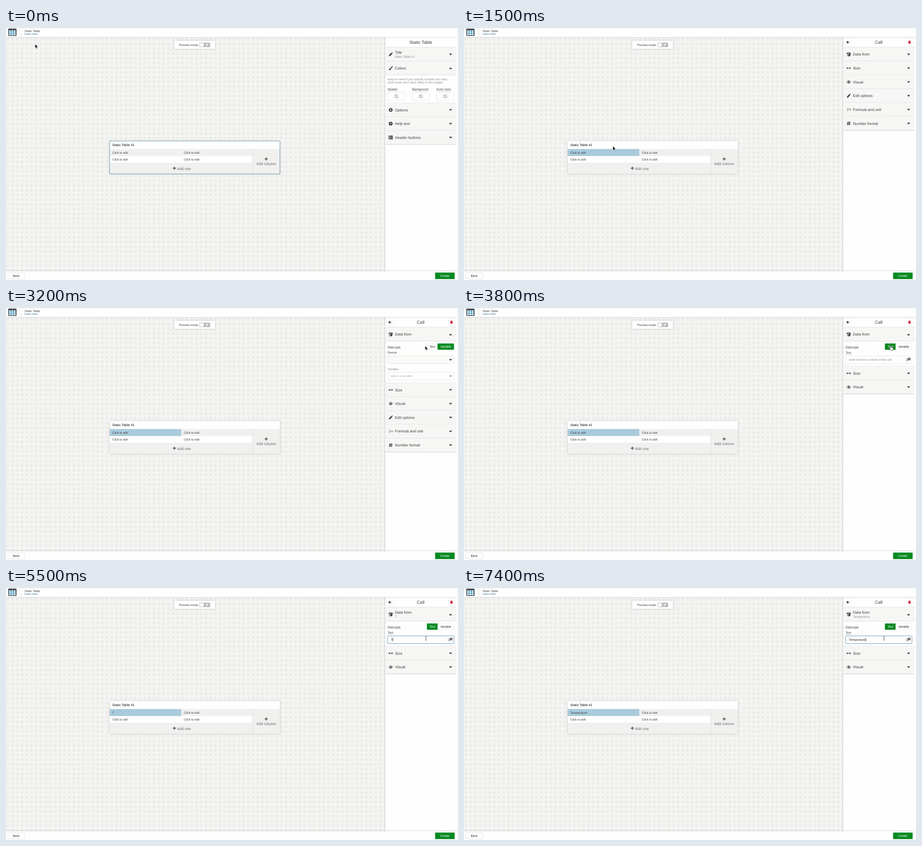
An HTML page that plays this animation: 1002 by 559 pixels, repeating every 8000 ms.

```html
<!DOCTYPE html>
<html lang="en">
<head>
<meta charset="utf-8">
<title>Static table editor</title>
<style>
html, body { margin: 0; width: 100%; height: 100%; overflow: hidden; background: #fefefe; }
svg { display: block; width: 100%; height: 100%; }
text { font-family: "Liberation Sans", Arial, sans-serif; text-rendering: geometricPrecision; white-space: pre; }
.shade { filter: drop-shadow(0 .7px 1.6px rgba(0, 0, 0, .28)); }
</style>
</head>
<body>
<svg viewBox="0 0 1002 559">
  <defs>
    <pattern id="dots" x="-1" y="20" width="10.45" height="10.45" patternUnits="userSpaceOnUse">
      <rect x="2.4" y="2.4" width="5.8" height="5.8" rx="1.4" fill="#ebebe9"/>
    </pattern>
  </defs>
  <g id="base"></g>
  <g id="live"></g>
</svg>
<script>
const LOOP = 8000, INK = '#3c3c3c', GREEN = '#0a8a23', BLUE = '#1b7095', ROW = 30.65;
const $ = id => document.getElementById(id);

const rect = (x, y, w, h, fill, extra = '') =>
  `<rect x="${x}" y="${y}" width="${w}" height="${h}" fill="${fill}" ${extra}/>`;
const box = (x, y, w, h, fill = '#fefefe', stroke = '#dcdcdc', rx = 1) =>
  rect(x, y, w, h, fill, `stroke="${stroke}" stroke-width=".7" rx="${rx}"`);
const path = (d, fill = INK, extra = '') => `<path d="${d}" fill="${fill}" ${extra}/>`;
const line = (d, stroke = INK, w = 1, extra = '') =>
  `<path d="${d}" fill="none" stroke="${stroke}" stroke-width="${w}" ${extra}/>`;
const circle = (x, y, r, fill, extra = '') =>
  `<circle cx="${x}" cy="${y}" r="${r}" fill="${fill}" ${extra}/>`;
const text = (x, y, s, size = 6.69, fill = INK, extra = '') =>
  `<text x="${x}" y="${y}" font-size="${size}" fill="${fill}" ${extra}>${s}</text>`;
const mid = (x, y, s, size, fill) => text(x, y, s, size, fill, 'text-anchor="middle"');
const at = (x, y, s, k = 1) => `<g transform="translate(${x} ${y}) scale(${k})">${s}</g>`;
const hint = (x, y, s, w) =>
  text(x, y, s) + line(`M${x} ${y + 1.5}h${w}`, '#555', .6, 'stroke-dasharray="1 .6"');
const plus = (x, y) => line(`M${x - 3.4} ${y}h6.8M${x} ${y - 3.4}v6.8`, '#5a5a5a', 1.9);
const caret = (y, up, fill = INK) => at(985.6, y, path('M-3.4 -1.8H3.4L0 2Z', fill), up ? '1 -1' : 1);

const PENCIL = c => path('M-4.2 4.2L-3.5 1.3L1.3 -3.5L3.5 -1.3L-1.3 3.5ZM2 -4.1L2.6 -4.6Q3.1 -4.9 3.6 -4.4L4.4 -3.6Q4.9 -3.1 4.5 -2.6L4 -2.1Z', c);
const ICONS = {
  pencil: PENCIL(INK),
  brush: path('M4.4 -4.5Q5 -4 4.4 -3.1L1.2 1.2L-.7 -.5L3.3 -4.2Q4 -4.8 4.4 -4.5ZM-1.2 .1L.6 1.8Q.6 4.2 -2 4.3Q-4 4.4 -4.6 2.3Q-3.5 2.8 -3.1 1.6Q-2.5 0 -1.2 .1Z'),
  cog: circle(0, 0, 2.5, 'none', `stroke="${INK}" stroke-width="2"`) +
    circle(0, 0, 3.9, 'none', `stroke="${INK}" stroke-width="1.3" stroke-dasharray="1.6 1.463"`),
  help: circle(0, 0, 4.3, INK) + mid(0, 2.5, '<tspan font-weight="bold">?</tspan>', 7, '#fff'),
  list: [-3, 0, 3].map(y => rect(-4.7, y - 1.2, 2.3, 2.3, INK) + rect(-1.7, y - 1.2, 6.5, 2.3, INK)).join(''),
  data: path('M-4.3 -2.4Q-4 -4.4 0 -4.4Q4.6 -4.4 4.4 -2.4L3.5 3Q2.9 4.4 -.2 4.4Q-2.9 4.4 -3.3 3Z') +
    path('M-3 -2.6Q0 -4.2 3 -2.7Q0 -1.3 -3 -2.6ZM-3.3 -.6L-.3 -.1L-.8 3L-2.7 2.3Z', '#f6f6f5'),
  size: line('M-3.5 0H3.5', INK, 1.1) + path('M-5 0L-2.4 -2.4V2.4ZM5 0L2.4 -2.4V2.4Z'),
  eye: line('M-4.6 0Q0 -6 4.6 0Q0 6 -4.6 0Z', INK, 1) + circle(0, 0, 2, INK) + circle(-.6, -.7, .7, '#f6f6f5'),
  formula: text(-4.8, 2.1, 'ƒ<tspan dy="-1" font-size="5.4">(x)</tspan>', 7, INK, 'font-style="italic"'),
  hash: line('M-1 -4.2L-2.3 4.2M2.3 -4.2L1 4.2M-3.8 -1.6H4.3M-4.3 1.6H3.8', INK, 1.3)
};

const CURSORS = {
  arrow: path('M0 0V9.2L2.1 7.3L3.7 10.6L5.2 9.9L3.7 6.8H6.6Z', '#111', 'stroke="#fff" stroke-width=".6"'),
  hand: path('M-1 .8Q-.9 -.1 0 0Q.8 0 .9 .9V3.7Q1.9 3.1 2.5 4Q3.4 3.5 4 4.4Q5.4 4.2 5.4 5.5V7.4Q5.3 9 4.5 10.8H-.1Q-.9 9.3 -3 7Q-3.7 5.9 -2.7 5.7Q-1.9 5.7 -1 6.8Z', '#fff', 'stroke="#222" stroke-width=".8"') +
    line('M.9 3.7V5.6M2.5 4V5.8M4 4.4V6', '#222', .5),
  beam: line('M-1.5 -3.9Q0 -3.9 0 -3V3Q0 3.9 -1.5 3.9M1.5 -3.9Q0 -3.9 0 -3M0 3Q0 3.9 1.5 3.9', '#222', .8)
};

// Pointer track: time, x, y; positions advance in 100 ms ticks
const TRACK = [
  [0, 64.5, 35.5], [200, 180, 74], [400, 440, 165], [500, 488, 212], [600, 420, 246], [700, 335, 269],
  [800, 305.5, 271.5], [1400, 305.5, 271.5], [1500, 330, 262], [1700, 540, 178], [2000, 787, 57],
  [2100, 787, 57], [2200, 868, 45.5], [2300, 873, 55], [2400, 876.5, 52], [2700, 876.5, 52],
  [2800, 878.5, 51.5], [2900, 878.5, 51.5], [3000, 856, 66], [3200, 929, 84], [3300, 976, 82],
  [3600, 946, 83], [3900, 946, 83], [4000, 945, 88], [4300, 932, 111], [4600, 931, 112]
];
const SHAPES = [[0, 'arrow'], [700, 'hand'], [1500, 'arrow'], [2200, 'hand'], [3000, 'arrow'],
  [3300, 'hand'], [4100, 'arrow'], [4200, 'beam']];
const KEYS = [5500, 5700, 5800, 6000, 6400, 6800, 6900, 7000, 7200, 7300, 7400];

function pointer(t) {
  const i = TRACK.findIndex(k => k[0] > t);
  const [t1, x1, y1] = i < 0 ? TRACK.at(-1) : TRACK[i];
  const [t0, x0, y0] = i < 0 ? TRACK.at(-1) : TRACK[i - 1];
  const p = t1 > t0 ? (t - t0) / (t1 - t0) : 0;
  return at(x0 + (x1 - x0) * p, y0 + (y1 - y0) * p, CURSORS[SHAPES.findLast(s => s[0] <= t)[1]]);
}

function section(y, icon, label, { sub, open, hover } = {}) {
  const c = y + ROW / 2;
  return rect(840.5, y, 158.5, ROW, hover ? '#f0f0ef' : '#f6f6f5') +
    line(`M840.5 ${y + ROW - .2}h158.5`, '#d6d6d6', .8) +
    at(852.8, c + .1, ICONS[icon]) +
    text(862.3, c + (sub ? -1.8 : 3), label, 8.36) +
    (sub ? text(862.3, c + 7.8, sub, 6.69, '#8a8a8a') : '') + caret(c + .3, open);
}
const sections = (y, items) => items.map(([icon, label], i) => section(y + i * ROW, icon, label)).join('') +
  rect(840.5, y + items.length * ROW, 158.5, 1.2, '#000', 'opacity=".07"');

function tablePanel() {
  const swatch = (x, label, w) => hint(x, 138, label, w) + box(x, 143, 38.3, 17.3) +
    circle(x + 19.1, 151.6, 3.6, 'none', 'stroke="#8c8c8c"') +
    line(`M${x + 16.6} 149.1l5 5`, '#8c8c8c');
  return mid(919.5, 35, 'Static Table', 9.78) +
    section(43, 'pencil', 'Title', { sub: 'Static Table #1' }) +
    section(43 + ROW, 'brush', 'Colors', { open: true }) +
    text(846, 116.1, 'Keep in mind if you specify at least one color,', 6.69, '#8a8a8a') +
    text(846, 123.3, "dark mode won't take effect in this widget.", 6.69, '#8a8a8a') +
    swatch(846, 'Header', 22) + swatch(900.3, 'Background', 36) + swatch(954.6, 'Even rows', 31.5) +
    line('M840.5 166h158.5', '#d6d6d6', .8) +
    sections(166.2, [['cog', 'Options'], ['help', 'Help text'], ['list', 'Header buttons']]);
}

function cellPanel(t, typed) {
  const open = t >= 2600, asText = t >= 3800, focus = t >= 4300;
  const choice = (x, w, label, on) => box(x, 79, w, 13.3, on ? GREEN : '#fefefe', on ? GREEN : '#e4e4e4') +
    mid(x + w / 2, 88, label, 6.69, on ? '#fff' : '#222');
  const more = [['pencil', 'Edit options'], ['formula', 'Formula and unit'], ['hash', 'Number format']];
  const look = [['size', 'Size'], ['eye', 'Visual']];
  let s = box(843.6, 25, 15, 13.3, '#fefefe', '#ececec') +
    line('M854 31.6h-5M851.4 28.9L848.7 31.6L851.4 34.3', '#111', 1.3) +
    mid(919.5, 35, 'Cell', 9.78) + box(980, 25, 15, 13.3, '#fefefe', '#ececec') +
    path('M984.7 28.7h1.7l.4 -.7h1.6l.4 .7h1.7v1h-5.8ZM985.1 30.2h5l-.3 4.6h-4.4Z', '#cc1236') +
    section(43, 'data', 'Data from', { sub: typed, open, hover: t >= 2200 && t < 3000 });
  if (!open) return s + sections(43 + ROW, look.concat(more));
  s += hint(846, 88.5, 'Data type', 28.5) +
    choice(933.3, 23.7, 'Text', asText) + choice(957, 35.8, 'Variable', !asText);
  if (!asText) {
    return s + text(846, 101.2, 'Device') + box(846, 106.2, 147, 17.2, '#fbfaf7') + caret(115, false) +
      text(846, 137.8, 'Variable', 6.69, '#8a8a8a') + box(846, 142.6, 147, 17) +
      text(853, 153.3, 'select a variable', 6.69, '#b0b0b0') + caret(151.2, false, '#999') +
      line('M840.5 166h158.5', '#d6d6d6', .8) + sections(166.2, look.concat(more));
  }
  const border = !focus ? '#dcdcdc' : t < 4500 ? '#6fa3ba' : BLUE;
  const blink = focus && (t < 5000 || t >= 5500);
  return s + hint(846, 101.2, 'Text', 12.8) + box(846, 106.2, 147, 17.2, '#fefefe', border, 1.3) +
    (typed ? text(853, 117.2, typed, 6.69, '#222', 'id="entry"')
      : text(853, 117.2, 'enter the text content of this cell', 6.69, '#8a8a8a')) +
    (blink ? rect(853, 111, .8, 7.2, '#111', 'id="bar"') : '') +
    box(979.8, 112.4, 5.4, 5.4, '#fefefe', '#999', .5) + mid(982.4, 117, 'A', 4.6, '#555') +
    rect(983.8, 110.4, 5.8, 5.4, '#444', 'rx=".6"') + line('M985 112.2h3.4M986.7 111.3v.9M988 112.4Q987 114.3 985.3 114.6M985.6 112.6Q986.4 114 988.2 114.6', '#fff', .5) +
    line('M840.5 129h158.5', '#d6d6d6', .8) + sections(129.3, look);
}

function widget(t, typed) {
  const first = t >= 1300 ? '#a9cbdb' : t >= 700 ? '#d3e4eb' : '#f0f0ef';
  const edit = 'Click to edit', gray = '#f0f0ef';
  return rect(229.7, 250.7, 377.5, 73, gray, 'class="shade"') +
    rect(229.7, 250.7, 377.5, 17.8, '#fefefe') + text(235.6, 262.4, 'Static Table #1', 7.53, '#111') +
    rect(229.7, 268.5, 158.8, 15.5, first) + rect(229.7, 284, 317, 15, '#fefefe') +
    text(235.6, 279.2, typed || edit) + text(394.3, 279.2, edit) +
    text(235.6, 294.3, edit) + text(394.3, 294.3, edit) +
    line('M547 268.5V323.7', '#d9d9d9', .8) +
    plus(373.2, 311) + text(379, 314.5, 'Add row', 8.36, '#6a6a6a') +
    plus(576.8, 290.5) + mid(577, 304, 'Add column', 8.36, '#6a6a6a') +
    (t < 1300 ? line('M229.7 250.7h377.5v73h-377.5Z', BLUE, .9, 'stroke-dasharray="2 1"') : '');
}

function chrome() {
  let cells = '';
  for (let i = 0; i < 9; i++) cells += rect(6.6 + i % 3 * 5.3, 5.4 + (i / 3 | 0) * 3.9, 4.1, 2.7, '#fff');
  return rect(0, 20, 841, 520, '#f4f4f2') + rect(0, 20, 841, 520, 'url(#dots)') +
    rect(840.5, 20, 162, 520, '#fefefe', 'class="shade"') +
    rect(0, 539.2, 1002, 20, '#fefefe', 'class="shade"') +
    rect(0, 0, 1002, 20.3, '#fefefe', 'class="shade"') + rect(0, 0, 1002, .8, '#ececec') +
    rect(5, 1.6, 18.3, 16, '#3f4449', 'rx="1.3"') + rect(6.6, 5.4, 14.9, 10.6, '#1f83ab') + cells +
    line('M32.6 2V17.5', '#d2d2d2', .8) +
    text(41, 9.1, 'Static Table') + text(41, 15.2, 'Learn more', 5.7, BLUE) +
    rect(372.7, 28, 90.8, 18.5, '#fefefe', 'class="shade"') + text(383.4, 39.6, 'Preview mode') +
    rect(429, 32.4, 23.6, 9.8, '#b8b8b8', 'rx="1"') + rect(430, 33.4, 8.4, 7.8, '#fff', 'rx=".8"') +
    at(445.6, 37.3, PENCIL('#fff'), .72) +
    box(4, 542.6, 37.3, 14, '#fefefe', '#dcdcdc', 1.3) + mid(22.7, 552, 'Back', 6.69, '#222') +
    rect(951.2, 542.4, 43.4, 14.6, GREEN, 'rx="1.3"') + mid(972.9, 552, 'Create', 6.69, '#fff') +
    rect(840.5, 42.3, 158.5, .8, '#d6d6d6');
}

let shown = -1;
function draw(now) {
  const t = Math.floor(now % LOOP / 100) * 100;
  if (t !== shown) {
    shown = t;
    const typed = 'Temperature'.slice(0, KEYS.filter(k => k <= t).length);
    $('live').innerHTML = widget(t, typed) + (t < 1300 ? tablePanel() : cellPanel(t, typed)) + pointer(t);
    if ($('bar') && $('entry')) $('bar').setAttribute('x', 853 + $('entry').getComputedTextLength());
  }
  requestAnimationFrame(draw);
}

$('base').innerHTML = chrome();
const start = performance.now();
draw(0);
requestAnimationFrame(function tick(now) {
  shown = shown;
});
</script>
</body>
</html>
```
